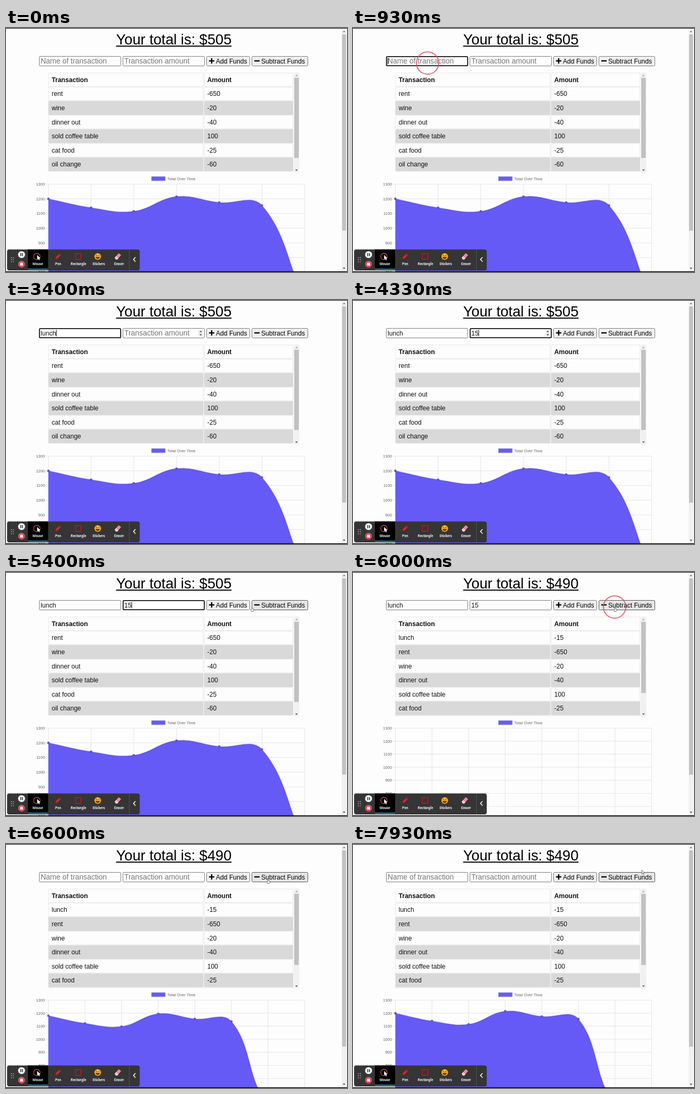
Write an HTML page with a canvas that moves like this. It is 640 px wide and 460 px high and loops after 8000 ms.

```html
<!DOCTYPE html>
<html lang="en">
<head>
<meta charset="utf-8">
<title>Budget tracker</title>
<style>
  html, body { margin: 0; width: 100%; height: 100%; overflow: hidden; background: #fdfdfd; }
  canvas { display: block; }
</style>
</head>
<body>
<canvas id="stage" width="640" height="460"></canvas>
<script>
const c = document.getElementById('stage').getContext('2d');
const LOOP = 8000;
const SANS = '"Liberation Sans", Arial, sans-serif';
const PURPLE = '#665af6';

// Event times in ms
const NAME_CLICK = 830, AMOUNT_CLICK = 3600, SUBMIT_CLICK = 5780;
const AMOUNT_HOVER = 3100, BUTTON_HOVER = 5400;
const UPDATE = 5930, CHART_START = 5995, CLEAR = 6030, LEAVE = 7700;
const nameKeys = [[1790, 'l'], [1850, 'u'], [1920, 'n'], [2120, 'c'], [2325, 'h']];
const amountKeys = [[4200, '1'], [4270, '5']];

const entries = [['oil change', -60], ['cat food', -25], ['sold coffee table', 100],
  ['dinner out', -40], ['wine', -20], ['rent', -650], ['lunch', -15]];

const clamp = x => Math.max(0, Math.min(1, x));

function rect(x, y, w, h, fill) {
  c.fillStyle = fill;
  c.fillRect(x, y, w, h);
}

function box(x, y, w, h, r, fill, stroke, width = 1) {
  c.beginPath();
  c.roundRect(x, y, w, h, r);
  if (fill) { c.fillStyle = fill; c.fill(); }
  if (stroke) { c.strokeStyle = stroke; c.lineWidth = width; c.stroke(); }
}

function disc(x, y, r, fill, stroke, width = 1) {
  c.beginPath();
  c.arc(x, y, r, 0, 2 * Math.PI);
  if (fill) { c.fillStyle = fill; c.fill(); }
  if (stroke) { c.strokeStyle = stroke; c.lineWidth = width; c.stroke(); }
}

function shape(d, fill, stroke, width = 1, x = 0, y = 0) {
  const p = new Path2D(d);
  c.save();
  c.translate(x, y);
  if (fill) { c.fillStyle = fill; c.fill(p); }
  if (stroke) { c.strokeStyle = stroke; c.lineWidth = width; c.stroke(p); }
  c.restore();
}

function text(s, x, y, size, fill = '#111', { weight = '', align = 'left', font = SANS } = {}) {
  c.font = `${weight} ${size}px ${font}`;
  c.textAlign = align;
  c.fillStyle = fill;
  c.fillText(s, x, y);
  return c.measureText(s).width;
}

function line(x1, y1, x2, y2, stroke, width = 1) {
  c.beginPath();
  c.moveTo(x1, y1);
  c.lineTo(x2, y2);
  c.strokeStyle = stroke;
  c.lineWidth = width;
  c.stroke();
}

const arrow = (x, y, dir, fill) =>
  shape(`M-2.5 ${-1.3 * dir}L2.5 ${-1.3 * dir}L0 ${1.5 * dir}Z`, fill, null, 1, x, y);

function field(x, t, hint, keys, focusAt, blurAt) {
  const focused = t >= focusAt && t < blurAt;
  if (focused) box(x + .8, 53.8, 152.4, 17.4, 2, '#fff', '#101010', 1.8);
  else box(x + .5, 53.5, 153, 18, 1, '#fff', '#7d7d7d');
  const typed = t < CLEAR ? keys.filter(k => t >= k[0]) : [];
  const value = typed.map(k => k[1]).join('');
  const width = value ? text(value, x + 3, 66.5, 12.1) : 0;
  if (!value) text(hint, x + 3, 66.5, 13.9, '#757575');
  const lastInput = typed.length ? typed[typed.length - 1][0] : focusAt;
  if (focused && (t - lastInput) % 1060 < 530) rect(x + 3 + width, 56.5, 1, 12, '#000');
}

function button(x, w, label, plus, hover) {
  box(x + .5, 53.5, w, 18, 2, hover ? '#e5e5e5' : '#efefef', hover ? '#555' : '#7d7d7d');
  rect(x + 5, 60.8, 10, 2.4, '#000');
  if (plus) rect(x + 8.8, 57, 2.4, 10, '#000');
  text(label, x + 18, 66.5, 12.1, '#000');
}

function table(rows) {
  const pitch = 26.6, top = 84;
  c.save();
  c.beginPath();
  c.rect(79, top, 472, 189);
  c.clip();
  [['Transaction', 'Amount'], ...rows].forEach((row, i) => {
    const y = top + i * pitch, weight = i ? '' : 'bold';
    [[79.5, 291], [371.5, 167.5]].forEach(([x, w], k) => {
      const gray = i && i % 2 === 0;
      box(x + .5, y + .8, w - 1, pitch - 1.2, 0, gray ? '#d9d9d9' : '#fdfdfd', gray ? '#d9d9d9' : '#e9e9e9');
      text(row[k], x + 6.2, y + 17.8, 12.1, '#111', { weight });
    });
  });
  rect(540, top, 10.5, 189, '#f1f1f1');
  rect(541, 94, 8.5, rows.length > 6 ? 134 : 151, '#c1c1c1');
  arrow(545.2, 89.5, -1, '#a3a3a3');
  arrow(545.2, 268, 1, '#505050');
  c.restore();
}

// Control points on both sides of each point of a smooth line
function handles(points) {
  return points.map((p, i) => {
    const a = points[i - 1] || p, b = points[i + 1] || p;
    const before = Math.hypot(p.x - a.x, p.y - a.y), after = Math.hypot(b.x - p.x, b.y - p.y);
    const k = .4 / (before + after);
    return {
      inX: p.x - k * before * (b.x - a.x), inY: p.y - k * before * (b.y - a.y),
      outX: p.x + k * after * (b.x - a.x), outY: p.y + k * after * (b.y - a.y)
    };
  });
}

function chart(list, grow) {
  const left = 79.5, right = 560.5, top = 294.3, bottom = 516;
  let total = 1200;
  const totals = [total, ...list.map(e => total += e[1])];
  const min = Math.floor(Math.min(...totals) / 100) * 100;
  const toY = v => top + (1300 - v) / (1300 - min) * (bottom - top);
  const toX = i => left + i * (right - left) / (totals.length - 1);

  box(273, 280, 26, 8, 0, PURPLE, '#a9a6d8', .8);
  text('Total Over Time', 302.7, 286.6, 7.57, '#666');
  for (let v = min; v <= 1300; v += 100) {
    line(74, toY(v), right, toY(v), '#e5e5e5');
    text(v, 73.2, toY(v) + 2.6, 7.57, '#666', { align: 'right' });
  }
  totals.forEach((_, i) => line(toX(i), top, toX(i), bottom, '#e5e5e5'));

  const points = totals.map((v, i) => ({ x: toX(i), y: toY(v) }));
  const h = handles(points);
  const rise = y => bottom + (Math.max(top, Math.min(bottom, y)) - bottom) * grow;
  const curve = new Path2D();
  curve.moveTo(left, rise(points[0].y));
  for (let i = 1; i < points.length; i++) {
    curve.bezierCurveTo(h[i - 1].outX, rise(h[i - 1].outY), h[i].inX, rise(h[i].inY),
      points[i].x, rise(points[i].y));
  }
  const area = new Path2D(curve);
  area.lineTo(right, bottom);
  area.lineTo(left, bottom);
  c.fillStyle = PURPLE;
  c.fill(area);
  c.strokeStyle = 'rgba(0,0,0,.1)';
  c.lineWidth = 2.2;
  c.stroke(curve);
  points.forEach(p => disc(p.x, rise(p.y), 2.2, '#5f54e0', 'rgba(0,0,0,.1)', .8));
}

function toolbar() {
  box(2, 417.5, 249, 39.5, 4, '#353535');
  for (let i = 0; i < 6; i++) disc(10.2 + i % 2 * 3.6, 433 + (i >> 1) * 3.9, .9, '#bbb');
  disc(29.2, 427.2, 6.5, '#f4f4f4');
  rect(26.8, 424.3, 1.6, 5.8, '#333');
  rect(30, 424.3, 1.6, 5.8, '#333');
  disc(29.2, 445.2, 6.5, '#dc4a5c');
  box(26.6, 442.6, 5.2, 5.2, .5, '#fff');
  rect(41, 417.5, 38, 38, '#000');
  rect(41, 453.8, 38, 1.8, '#1b9fe0');
  ['Mouse', 'Pen', 'Rectangle', 'Stickers', 'Eraser'].forEach((label, i) =>
    text(label, 59.8 + i * 38.1, 446.7, 6.4, '#eee', { weight: 'bold', align: 'center', font: 'Roboto, sans-serif' }));
  disc(58, 430.8, 6, null, '#b8404e', 1.4);
  shape('M0 0V8.5L2 6.8L3.5 9.8L5 9L3.6 6.2H6.2Z', '#fff', null, 1, 58.5, 428);
  shape('M93 435.5L94 431.8L100 425.3L103 428L96.8 434.5Z', '#e0202c');
  line(98.6, 426.8, 101.6, 429.6, '#8e1018');
  box(130, 425.5, 10.5, 10.5, 0, null, '#d0101c', 1.4);
  disc(172.2, 430.8, 6.2, '#f5b52e');
  shape('M168 431.5H176.4Q175.5 435.5 172.2 435.5Q169 435.5 168 431.5Z', '#8c2b1c');
  shape('M168.3 429.5L170 427.8L171.3 429.5M173.2 429.5L174.7 427.8L176.3 429.5', null, '#7a3a10');
  shape('M204 433L211.5 424.5L216 428L209 436.5H206Z', '#e88a98');
  shape('M204 433L206.4 430.3L211 434L209 436.5H206Z', '#f6ccd2');
  line(231.5, 418, 231.5, 457, '#505050');
  shape('M243 432.2L239.3 436.3L243 440.4', null, '#fff', 1.5);
}

function ring(t, start, x, y) {
  const age = t - start;
  if (age < 0 || age > 330) return;
  c.globalAlpha = .8 * clamp((330 - age) / 80);
  disc(x, y, 21 * clamp(.5 + age / 160), null, '#dc4a5c', 2);
  c.globalAlpha = 1;
}

function cursor(t) {
  if (t < BUTTON_HOVER - 120) return;
  const arrive = clamp((t - BUTTON_HOVER + 120) / 240), leave = clamp((t - LEAVE) / 220);
  const ease = k => k * k * (3 - 2 * k);
  const x = 430 + 61 * ease(arrive) + 51 * ease(leave);
  const y = 65.5 - 16.5 * ease(leave);
  const hand = 'M0 0.8Q1 0 1.4 1V3.6L4 4.4V7L3 9H-.2L-2 6L-1.2 5.4L0 6.2Z';
  const pointer = 'M0 0V7.2L1.7 5.8L2.9 8.4L4 7.9L2.9 5.4H5.2Z';
  shape(y < 53 ? pointer : hand, '#fff', '#555', .8, x, y);
}

function draw(t) {
  const updated = t >= UPDATE;
  const list = updated ? entries : entries.slice(0, 6);
  rect(0, 0, 640, 460, '#fdfdfd');

  const title = `Your total is: $${updated ? 490 : 505}`;
  const width = text(title, 315, 31, 27.2, '#000', { align: 'center' });
  rect(315 - width / 2, 33.2, width, 2, '#000');

  field(62, t, 'Name of transaction', nameKeys, NAME_CLICK, AMOUNT_CLICK);
  field(219, t, 'Transaction amount', amountKeys, AMOUNT_CLICK, SUBMIT_CLICK);
  if (t >= AMOUNT_HOVER && t < BUTTON_HOVER - 100) {
    rect(361, 56, 9, 13, '#efefef');
    arrow(365.5, 59.3, -1, '#505050');
    arrow(365.5, 65.7, 1, '#505050');
  }
  button(376, 81, 'Add Funds', true, false);
  button(461, 105, 'Subtract Funds', false, t >= BUTTON_HOVER);

  table([...list].reverse());
  chart(list, updated ? 1 - (1 - clamp((t - CHART_START) / 1000)) ** 4 : 1);

  rect(630, 0, 9, 460, '#f1f1f1');
  rect(630.8, 12, 7.4, 370, '#c1c1c1');
  arrow(634.5, 6.5, -1, '#777');
  arrow(634.5, 453, 1, '#505050');

  toolbar();
  ring(t, NAME_CLICK, 140, 66);
  ring(t, AMOUNT_CLICK, 290, 62);
  ring(t, SUBMIT_CLICK, 491, 66);
  cursor(t);
  rect(0, 0, 640, 1, '#000');
  rect(0, 458.7, 640, 1.3, '#000');
}

const begin = performance.now();
function tick() {
  draw((performance.now() - begin) % LOOP);
  requestAnimationFrame(tick);
}
tick();
</script>
</body>
</html>
```
